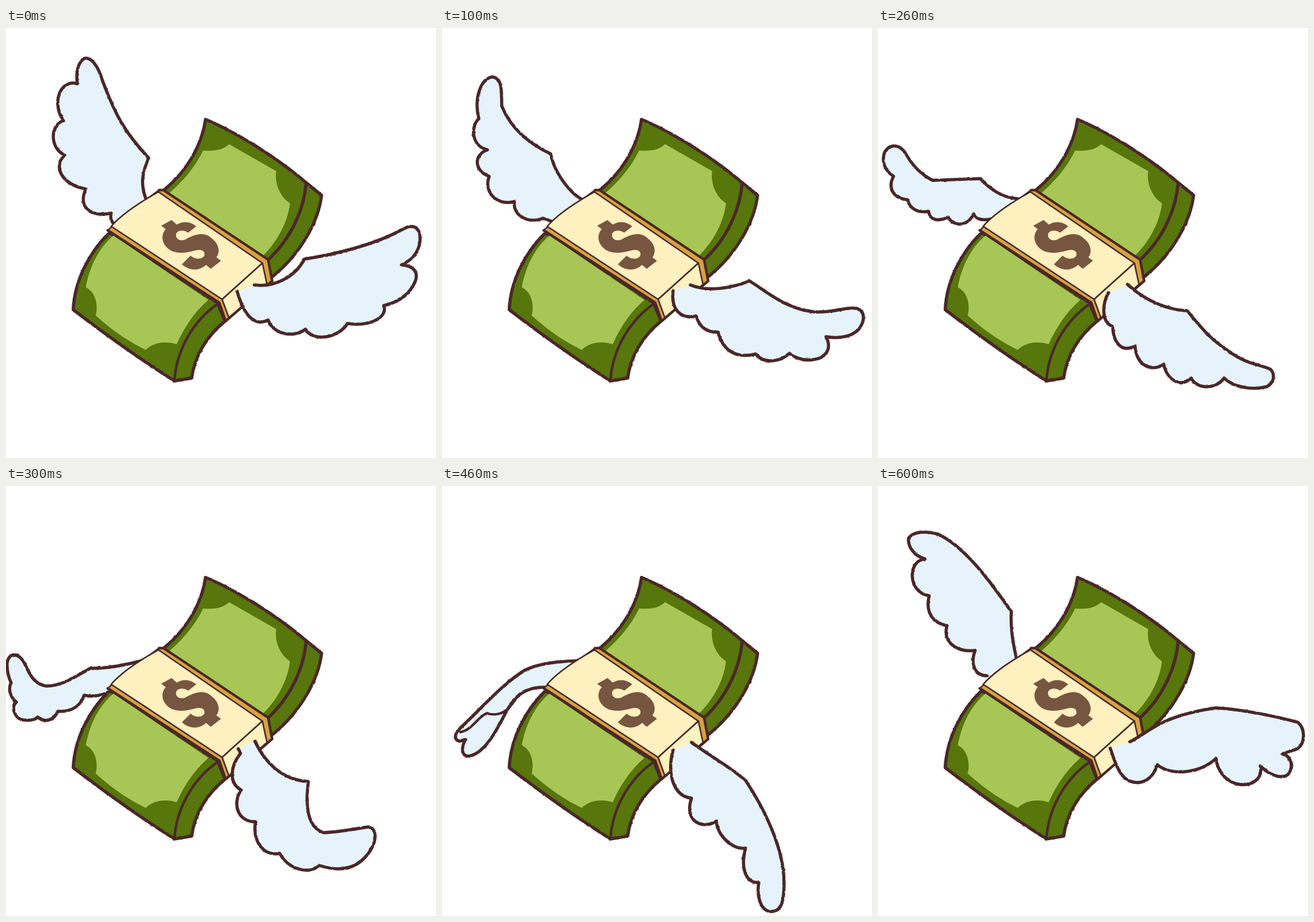
An HTML page that plays this animation: 748x748 px, repeating every 700 ms.

```html
<!DOCTYPE html>
<html lang="en">
<head>
<meta charset="utf-8">
<title>Flying cash</title>
<style>
  html, body { margin: 0; width: 100%; height: 100%; overflow: hidden; background: #fff; }
  svg { display: block; width: 100%; height: 100%; }
  .ink { stroke: #4a2728; stroke-width: 5.5; stroke-linecap: round; stroke-linejoin: round; }
  .mid { stroke-width: 4.5; }
  .thin { stroke-width: 2.6; }
  .dark { fill: #57760b; }
  .light { fill: #a7c655; }
  .cream { fill: #fff0bf; }
  .gold { fill: #d6a244; }
  .wing { fill: #e6f3fa; }
  .none { fill: none; }
  .rough { filter: url(#rough); }
  .pose { visibility: hidden; }
</style>
</head>
<body>
<svg viewBox="0 0 748 748">
  <filter id="rough" filterUnits="userSpaceOnUse" x="0" y="0" width="748" height="748" color-interpolation-filters="sRGB">
    <feTurbulence type="fractalNoise" baseFrequency=".2" numOctaves="2" seed="4"/>
    <feDisplacementMap in="SourceGraphic" scale="2.4" xChannelSelector="R" yChannelSelector="G"/>
  </filter>

  <g id="back" class="ink wing rough">
    <path class="pose" d="M243 296C233 270 238 250 248 226C205 180 190 150 168 92C160 65 148 50 136 53C123 62 122 80 124 97C95 88 78 130 100 161C75 170 77 210 102 221C82 240 95 272 139 280C125 310 145 330 183 322C181 330 183 336 187 340"/>
    <path class="pose" d="M243 298C220 285 195 250 189 219C150 200 120 175 104 136C103 110 106 88 88 85C68 88 55 120 64 158C50 170 50 205 79 212C55 220 55 248 82 258C72 285 95 310 126 302C122 325 150 342 176 331L190 336"/>
    <path class="pose" d="M243 297C215 295 195 280 178 262L95 265C75 255 60 240 48 218C38 203 22 200 12 215C5 232 12 248 27 258C18 275 22 295 52 299C55 315 70 322 88 319C90 335 105 337 122 329C130 345 155 347 166 324C172 334 185 335 198 332"/>
    <path class="pose" d="M240 303C205 312 170 318 147 317C125 328 100 348 70 348C50 345 42 330 32 308C22 290 5 288 2 308C1 320 5 335 9 342C2 355 10 370 18 376C8 385 15 405 30 407C40 408 50 408 55 402C70 414 85 405 90 392C115 393 130 382 136 364C150 368 165 364 182 358"/>
    <g class="pose">
      <path d="M236 304C200 305 165 310 145 320C110 340 70 385 32 421C22 430 20 441 30 444L41 441C33 455 33 470 47 470C75 465 95 425 112 392C120 378 128 368 136 362C150 352 165 350 182 350"/>
      <path class="none mid" d="M32 428C52 425 62 402 78 395C85 398 95 398 103 395C118 390 125 372 136 362"/>
    </g>
    <path class="pose" d="M245 296C225 280 215 265 211 249C195 230 170 215 145 215C100 207 55 210 20 205C8 202 5 212 7 228C10 245 22 260 46 253C25 262 20 280 40 288C50 292 60 290 76 286C62 295 75 312 108 305C98 320 115 335 135 335C150 334 162 330 173 324C178 332 188 334 197 332"/>
    <path class="pose" d="M241 300C235 275 230 245 232 219C195 165 150 105 105 84C85 78 60 78 53 92C52 108 65 122 82 127C52 128 50 185 89 191C82 220 95 238 120 243C112 270 135 290 169 286C160 310 168 330 190 330"/>
  </g>

  <!-- upper half of the stack -->
  <path class="ink dark rough" d="M272 284C312 252 340 208 347 159C400 181 472 226 522 269L549 291C543 340 510 395 463 433L440 410Z"/>
  <path class="light" d="M283 288C310 265 330 240 343 213Q374 216 388 202L470 249C467 270 476 293 494 305C490 340 470 375 443 400Z"/>
  <path class="ink none" d="M522 269C519 315 495 368 455 404"/>

  <!-- lower half of the stack -->
  <path class="ink dark rough" d="M180 356C145 390 119 440 117 490Q205 558 293 614L323 609C328 570 350 535 381 510L368 478Z"/>
  <path class="light" d="M187 361L352 473C329 493 310 520 297 550C277 544 256 547 243 560Q197 538 156 500C161 480 155 459 139 451C145 415 162 382 187 361Z"/>
  <path class="ink none mid" d="M293 612C297 560 325 510 368 480"/>

  <!-- paper band -->
  <g class="ink thin">
    <path class="gold" d="M266 282L274 282L456 403L463 440L382 510L371 478L177 352Q184 346 190 339Z"/>
    <path class="cream" d="M265 285L446 409L376 472L183 345Q205 319 265 285Z"/>
    <path class="cream" d="M446 409L454 446L388 505L376 472Z"/>
    <path class="none mid" d="M266 282L274 282L456 403L463 440L382 510L371 478L177 352"/>
  </g>
  <path fill="#765640" d="M270 344L288 334L297 342C308 335 322 337 331 345L317 356C308 350 298 352 296 358C294 366 302 372 312 368C330 358 345 354 358 366C371 376 373 390 366 399L374 405L356 419L348 412C335 424 318 422 306 411L321 396C329 403 341 403 345 396C347 388 340 384 329 387C312 392 292 394 280 382C270 372 270 358 278 350Z"/>

  <g id="front" class="ink wing rough">
    <path class="pose" d="M432 447C470 452 505 430 519 402C570 394 640 378 690 350C712 338 722 350 720 372C718 390 705 405 688 412C718 415 718 433 707 450C697 467 678 478 657 483C665 502 635 520 594 514C580 538 535 548 521 524C500 540 465 533 456 508C432 520 414 500 402 458"/>
    <path class="pose" d="M432 447C465 460 505 452 535 440C570 462 600 490 650 494C685 495 705 484 722 488C738 494 735 512 724 525C712 537 690 541 668 537C680 560 665 575 645 577C630 579 615 574 604 566C590 580 560 586 546 567C515 575 490 565 480 529C460 530 448 520 442 501C415 507 398 490 402 457"/>
    <path class="pose" d="M434 446C462 472 500 490 538 492C555 512 575 540 610 562C640 585 665 585 683 594C692 604 688 618 676 624C652 630 620 626 602 609C585 632 552 626 545 609C525 628 502 610 497 585C478 598 450 590 447 553C425 565 410 550 408 519C388 512 390 480 401 460"/>
    <path class="pose" d="M433 444C450 480 480 512 526 514C520 560 525 595 553 603C580 602 605 597 630 593C645 595 645 615 635 632C618 660 590 675 545 660C525 678 490 665 476 639C450 645 428 620 434 584C405 585 392 555 409 529C385 515 392 485 408 465L404 457"/>
    <path class="pose" d="M434 446C470 472 500 488 528 512C560 560 595 630 595 690C595 725 590 742 570 740C555 738 547 715 551 690C525 690 520 660 528 630C505 632 480 610 477 583C455 598 420 585 434 543C405 540 390 505 402 459"/>
    <path class="pose" d="M431 447C480 437 530 440 570 460C625 490 665 530 705 565C715 580 710 600 695 607C670 605 640 598 619 582C640 595 648 610 634 622C605 638 560 625 549 580C540 610 520 620 498 611C480 600 473 570 478 540C450 542 432 520 434 492C415 500 398 480 405 457"/>
    <path class="pose" d="M438 445C470 430 487 401 587 386C630 388 690 400 730 411C742 420 745 445 730 457L703 466C720 470 724 490 712 503C700 510 680 502 665 487C670 510 650 522 628 519C605 515 590 495 588 474C560 500 510 505 486 485C478 510 460 520 440 514C420 508 412 480 404 456"/>
  </g>
</svg>
<script>
  const STEP = 100, POSES = 7, LOOP = STEP * POSES;
  const flash = [
    { offset: 0, visibility: 'visible', easing: 'step-end' },
    { offset: 1 / POSES, visibility: 'hidden', easing: 'step-end' },
    { offset: 1, visibility: 'hidden' }
  ];

  // Each pose holds for one step; the wings share the same beat.
  for (const id of ['back', 'front']) {
    [...document.getElementById(id).children].forEach((pose, i) => {
      pose.animate(flash, { duration: LOOP, delay: i * STEP - LOOP, iterations: Infinity });
    });
  }
</script>
</body>
</html>
```
